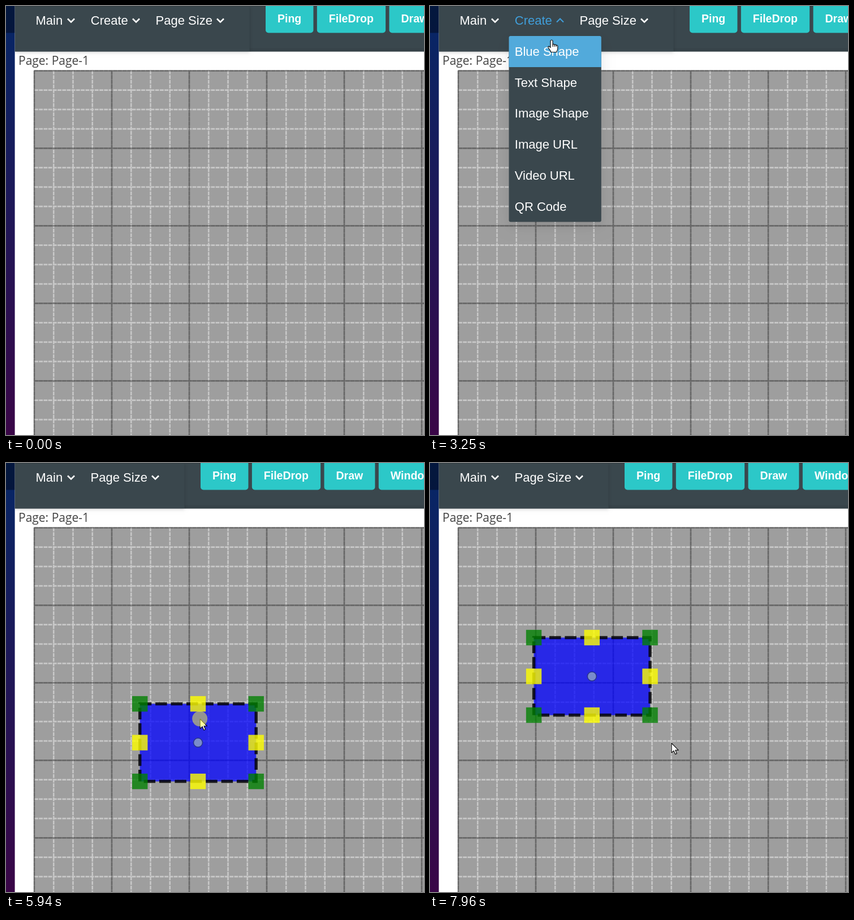
An HTML page with a canvas for the animation above (8 s loop, 739 by 758 pixels).

```html
<!DOCTYPE html>
<html lang="en">
<head>
<meta charset="utf-8">
<title>Diagram editor</title>
<style>
html, body { margin: 0; width: 100%; height: 100%; overflow: hidden; background: #fff; }
canvas { display: block; }
</style>
</head>
<body>
<canvas id="stage" width="739" height="758"></canvas>
<script>
const W = 739, H = 758, LOOP = 8000, CELL = 34.25;
const BAR = '#3a474d', TEAL = '#2cc8c8', BLUE = '#409fdb';
const SANS = '"Liberation Sans", Arial, sans-serif';
const MENU_FONT = '22px ' + SANS;
const ITEMS = ['Blue Shape', 'Text Shape', 'Image Shape', 'Image URL', 'Video URL', 'QR Code'];
const ctx = document.getElementById('stage').getContext('2d');

const ENTER = 650, PRESS = 2170, OPEN = 2310, CHOOSE = 3720, CREATED = 3860, GRAB = 5410, DROP = 6680;

// Each leg continues from the last one: start, end, x, y, sideways bend
const LEGS = [
  [0, 580, 670, 780],
  [580, 920, 487, 446],
  [1120, 1970, 232.5, 24],
  [1970, 2170, 232.5, 20],
  [2900, 3250, 215, 60],
  [3250, 3520, 213, 72],
  [4340, 5210, 427, 572],
  [GRAB, 6070, 337, 437, 11],
  [6150, 6340, 311, 379.5],
  [DROP, 7090, 498, 590],
  [7220, 7960, 427, 495]
].map(([start, end, x, y, bend = 0]) => ({ start, end, x, y, bend }));

function pointerAt(t) {
  let i = 1;
  while (i < LEGS.length - 1 && t >= LEGS[i + 1].start) i++;
  const a = LEGS[i - 1], b = LEGS[i];
  const u = Math.min(1, Math.max(0, (t - b.start) / (b.end - b.start)));
  const s = u * u * (3 - 2 * u);
  const dx = b.x - a.x, dy = b.y - a.y;
  const side = b.bend * Math.sin(Math.PI * s) / (Math.hypot(dx, dy) || 1);
  return { x: a.x + dx * s + dy * side, y: a.y + dy * s - dx * side };
}

// The shape trails the pointer while dragged
function shapeAt(t) {
  const p = pointerAt(Math.min(DROP, Math.max(GRAB, t - 156)));
  return { x: p.x - 24.7, y: p.y - 2.5 };
}

function rect(x, y, w, h, fill) {
  ctx.fillStyle = fill;
  ctx.fillRect(x, y, w, h);
}

function round(x, y, w, h, r, fill) {
  ctx.beginPath();
  ctx.roundRect(x, y, w, h, r);
  ctx.fillStyle = fill;
  ctx.fill();
}

function disc(x, y, r, fill) {
  ctx.beginPath();
  ctx.arc(x, y, r, 0, Math.PI * 2);
  ctx.fillStyle = fill;
  ctx.fill();
}

function label(text, x, y, font, fill) {
  ctx.font = font;
  ctx.fillStyle = fill;
  ctx.fillText(text, x, y);
}

function shadow(blur, dy, alpha) {
  ctx.shadowBlur = blur;
  ctx.shadowOffsetY = dy;
  ctx.shadowColor = `rgba(0,0,0,${alpha})`;
}

function gridLines(step, color, dash) {
  ctx.strokeStyle = color;
  ctx.lineWidth = 2.6;
  ctx.setLineDash(dash);
  ctx.beginPath();
  for (let d = 0; d < W; d += CELL) {
    if (Math.round(d / CELL) % 4 === 0 ? step === 1 : step === 4) continue;
    ctx.moveTo(50 + d, 114);
    ctx.lineTo(50 + d, H);
    ctx.moveTo(50, 114.4 + d);
    ctx.lineTo(W, 114.4 + d);
  }
  ctx.stroke();
  ctx.setLineDash([]);
}

function drawPage() {
  rect(0, 0, W, H, '#fff');
  const g = ctx.createLinearGradient(0, 0, 0, 757);
  g.addColorStop(0, '#052767');
  g.addColorStop(1, '#3a0647');
  rect(0, 0, 15.6, H, g);
  rect(0, 0, 15.6, 47.5, 'rgba(0,0,0,.4)');
  rect(49, 113.5, W, H, '#9e9e9e');
  const dash = [6.85, 1.37];
  gridLines(1, 'rgba(255,255,255,.43)', dash);
  gridLines(4, 'rgba(0,0,0,.26)', []);
  gridLines(4, 'rgba(0,0,0,.12)', dash);
  label('Page: Page-1', 22, 104, '21px "Open Sans", "Noto Sans", sans-serif', '#444');
}

function chevron(x, color, up) {
  const d = up ? -3 : 3;
  ctx.strokeStyle = color;
  ctx.lineWidth = up ? 2.1 : 2.6;
  ctx.beginPath();
  ctx.moveTo(x - 6, 25.5 - d);
  ctx.lineTo(x, 25.5 + d);
  ctx.lineTo(x + 6, 25.5 - d);
  ctx.stroke();
}

function entry(text, x, tip, color = '#fff', up = false) {
  label(text, x, 33, MENU_FONT, color);
  chevron(tip, color, up);
}

function drawBar(created, active, open) {
  const shift = created ? -115 : 0;
  const edge = 430.5 + shift;
  rect(15.6, 0, W, 80.4, BAR);
  rect(edge, 75, W, 5.4, '#364248');
  ctx.save();
  ctx.beginPath();
  ctx.rect(16, 0, W, 100);
  ctx.clip();
  shadow(6, 2, 0.16);
  rect(16, 0, edge - 16, 80.4, BAR);
  ctx.restore();
  rect(16, 0, W, 1, '#2f3a3f');

  entry('Main', 52.5, 115);
  if (!created) entry('Create', 149.8, 230, active ? BLUE : '#fff', open);
  entry('Page Size', 264.6 + shift, 379 + shift);

  let x = 459 + shift;
  ctx.font = 'bold 19.5px ' + SANS;
  for (const text of ['Ping', 'FileDrop', 'Draw', 'Window']) {
    const w = ctx.measureText(text).width + 42.2;
    round(x, -10, w, 57.5, 5, TEAL);
    label(text, x + 21, 29, ctx.font, '#fff');
    x += w + 6.4;
  }
}

function drawMenu(alpha, hover) {
  ctx.save();
  ctx.globalAlpha = alpha;
  shadow(22, 8, 0.1);
  round(139.5, 53, 163.3, 328.5, 3, BAR);
  shadow(0, 0, 0);
  if (hover) round(139.5, 53, 163.3, 55, [3, 3, 0, 0], '#52aadb');
  ITEMS.forEach((s, i) => label(s, 149.8, 88 + i * 54.7, MENU_FONT, '#fff'));
  ctx.restore();
}

function drawShape(c, hover, selected) {
  const w = 6 * CELL, h = 4 * CELL, x = c.x - w / 2, y = c.y - h / 2;
  rect(x, y, w, h, 'rgba(0,0,255,.75)');
  if (hover) {
    ctx.strokeStyle = 'rgba(240,0,10,.8)';
    ctx.lineWidth = 6.8;
    ctx.strokeRect(x, y, w, h);
  }
  if (!selected) return;
  ctx.strokeStyle = 'rgba(0,0,0,.82)';
  ctx.lineWidth = 5.4;
  ctx.setLineDash([20.55, 6.85]);
  ctx.strokeRect(x, y, w, h);
  ctx.setLineDash([]);
  for (let i = -1; i <= 1; i++) {
    for (let j = -1; j <= 1; j++) {
      if (!i && !j) continue;
      const fill = i && j ? 'rgba(0,128,0,.78)' : 'rgba(255,255,0,.8)';
      rect(c.x + i * w / 2 - 13.7, c.y + j * h / 2 - 13.7, 27.4, 27.4, fill);
    }
  }
  disc(c.x, c.y, 8, '#7a8ccb');
  ctx.strokeStyle = '#29348c';
  ctx.lineWidth = 1.5;
  ctx.stroke();
}

const ARROW = new Path2D('M0 0V17L4 13.4L6.6 19.6L9.4 18.4L6.8 12.4H12.2Z');
const HAND = new Path2D('M-2 1.5Q0-1.5 2 1.5V8Q3.6 6.6 5 8.6Q6.7 7.2 8 9.4Q10.4 8.6 10.8 11V15.5' +
  'Q10.5 18 9 20V21.5H-1.5V20L-5.6 14.2Q-7 11.4-4.6 11.2L-2 13.4Z');
const FINGERS = new Path2D('M2 8V12M5 8.6V12M8 9.4V12');

function drawPointer(p, hand) {
  const path = hand ? HAND : ARROW;
  ctx.save();
  ctx.translate(p.x, p.y);
  ctx.lineJoin = 'round';
  ctx.lineWidth = 1.2;
  ctx.strokeStyle = '#111';
  ctx.fillStyle = '#fff';
  ctx.fill(path);
  ctx.stroke(path);
  if (hand) ctx.stroke(FINGERS);
  ctx.restore();
}

function draw(t) {
  const p = pointerAt(t), c = shapeAt(t);
  const within = (a, b) => t >= a && t < b;
  const created = t >= CREATED, selected = t >= GRAB;
  const open = within(OPEN, CREATED);
  const active = open || (within(ENTER, OPEN) && p.x > 139 && p.x < 252 && p.y < 53);
  drawPage();
  drawBar(created, active, open);
  if (open) drawMenu(t < OPEN + 70 ? 0.55 : 1, p.y > 53);
  if (created) {
    const inside = Math.abs(p.x - c.x) < 3 * CELL && Math.abs(p.y - c.y) < 2 * CELL;
    drawShape(c, inside && !selected, selected);
  }
  if (t >= ENTER) drawPointer(p, active);
  if (within(PRESS, OPEN) || within(CHOOSE, CREATED) || within(GRAB, DROP)) {
    disc(p.x - 0.5, p.y - 0.5, 13.5, 'rgba(255,255,60,.5)');
  }
}

const began = performance.now();
function tick() {
  draw((performance.now() - began) % LOOP);
  requestAnimationFrame(tick);
}
tick();
</script>
</body>
</html>
```
